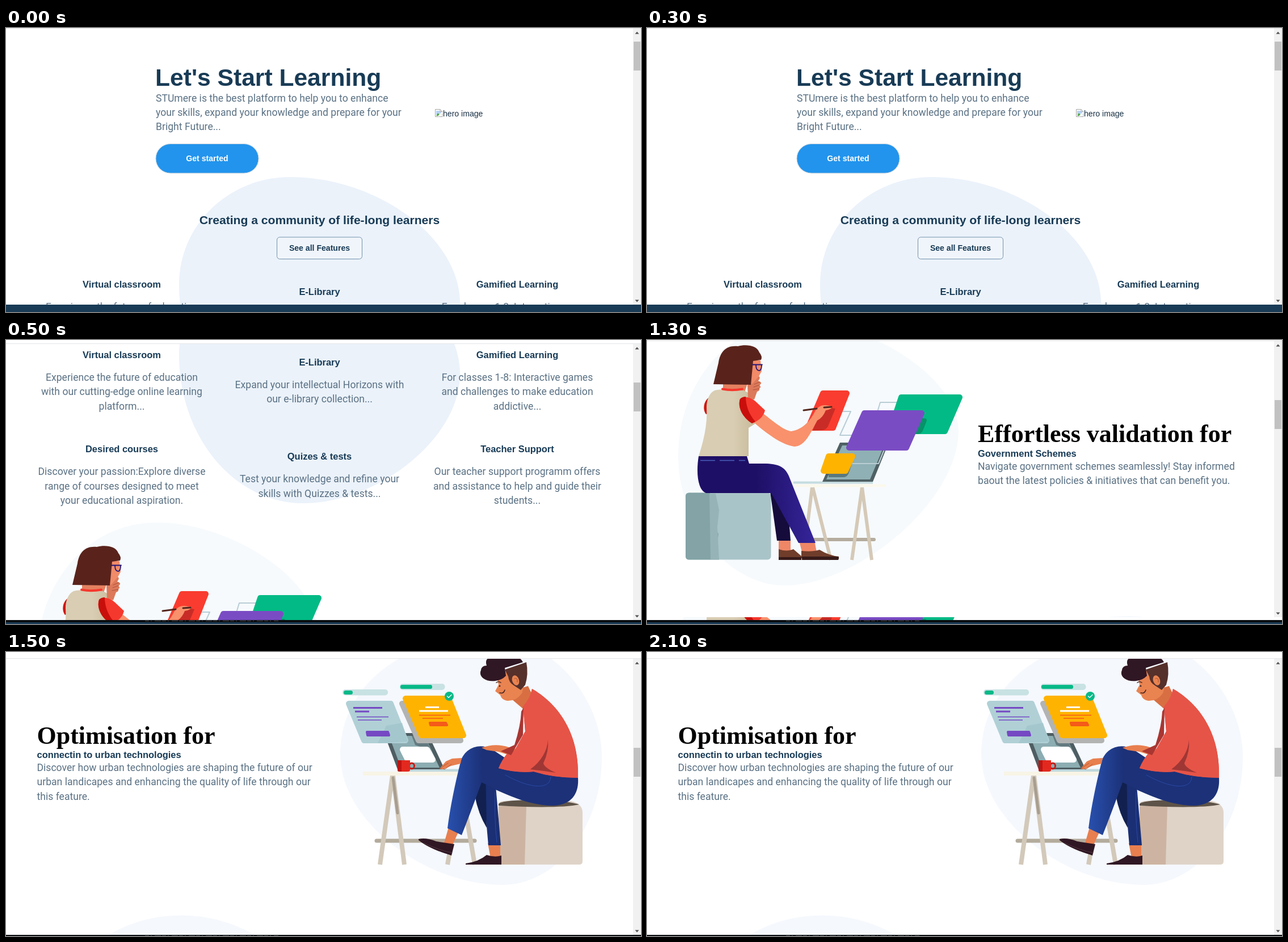
Animation, 1119 px wide and 501 px high, one loop 2500 ms. Source, as an HTML page:

```html
<!DOCTYPE html>
<html lang="en">
<head>
<meta charset="utf-8">
<title>Learning platform tour</title>
<style>
html, body { margin: 0; width: 100%; height: 100%; overflow: hidden; background: #fff; }
svg { display: block; width: 1119px; height: 501px; }
text { white-space: pre; }
.head { font: bold 16.47px "Liberation Sans", Arial, sans-serif; fill: #183b56; }
.body { font: 17.6px Roboto, sans-serif; fill: #5a7184; }
.serif { font: bold 44px "Liberation Serif", "Times New Roman", serif; fill: #000; }
.mid { text-anchor: middle; }
.card { fill: currentColor; stroke: currentColor; stroke-width: 10; stroke-linejoin: round; }
.line { fill: none; stroke-linecap: round; stroke-linejoin: round; }
</style>
</head>
<body>
<svg viewBox="0 0 1119 501">
  <defs>
    <clipPath id="viewClip"><rect id="viewBox" width="1105" height="488"/></clipPath>
    <clipPath id="stripClip"><rect y="489" width="1105" height="5"/></clipPath>
    <pattern id="dots" width="14" height="14" patternUnits="userSpaceOnUse" patternTransform="rotate(8)">
      <g fill="#f9c4b4"><circle cx="3" cy="3" r="1.8"/><circle cx="10" cy="10" r="1.8"/></g>
    </pattern>
    <linearGradient id="leg" x1="0" x2="1">
      <stop offset="0" stop-color="#2850ae"/><stop offset=".55" stop-color="#1c3178"/><stop offset="1" stop-color="#1c3178"/>
    </linearGradient>
    <linearGradient id="thigh" x1="0" x2="1">
      <stop offset=".5" stop-color="#1e0f66"/><stop offset="1" stop-color="#35259a"/>
    </linearGradient>
    <linearGradient id="shirt" x1="0" x2="1">
      <stop offset="0" stop-color="#d9cdb3"/><stop offset=".6" stop-color="#d9cdb3"/><stop offset="1" stop-color="#c5b898"/>
    </linearGradient>

    <g id="page">
      <!-- hero -->
      <text x="263" y="102" class="head" style="font-size:42.6px">Let's Start Learning</text>
      <g id="heroText"></g>
      <rect x="264" y="204.500" width="181" height="51.500" rx="25.700" fill="#2294ed" stroke="#b9cbd8"/>
      <text x="354.500" y="235" class="head mid" style="font-size:14.08px;fill:#fff">Get started</text>
      <g transform="translate(756 143)">
        <path d="M.5 .5H9L13 4.500V13.500H.5Z" fill="#fff" stroke="#a5a5a5"/>
        <path d="M2 3H8L11 6V8L2 10Z" fill="#b7d2f5"/>
        <path d="M2 12L5 7L8 10L6 12Z" fill="#53a844"/>
        <path d="M13 6L6 13" stroke="#fff" stroke-width="2"/>
        <path d="M9 .5V4.500H13" fill="none" stroke="#a5a5a5"/>
      </g>
      <text x="770" y="156" style="font:14.08px 'Liberation Sans',Arial,sans-serif;fill:#183044">hero image</text>

      <!-- features -->
      <path d="M500 263C655 263 800 370 800 486C800 600 655 714 523 714C403 714 305 598 305 452C305 348 392 263 500 263Z" fill="#ebf2fa"/>
      <text x="552.500" y="345.500" class="head mid" style="font-size:21.12px">Creating a community of life-long learners</text>
      <rect x="477.500" y="369" width="150" height="38.500" rx="5" fill="#f0f5fb" stroke="#7291aa"/>
      <text x="552.500" y="392.500" class="head mid" style="font-size:14.08px">See all Features</text>
      <g id="features"></g>

      <!-- woman at a desk -->
      <g transform="translate(0 780)">
        <path d="M270-32C400-30 549 70 549 160C549 285 370 433 243 433C140 433 55 320 55 205C55 80 140-34 270-32Z" fill="#f6fafd"/>
        <g class="line" stroke="#d5c9b7" stroke-width="6" stroke-linecap="butt">
          <path d="M292 352H400" stroke="#b5ac9e"/>
          <path d="M291 260L275 388M292 260L324 388M379 260L361 388M379 260L396 388" style="stroke-linecap:butt"/>
        </g>
        <rect x="262" y="254.500" width="159" height="5" fill="#fbf8ec"/>
        <rect x="258" y="249.500" width="140" height="4" fill="#c5dce0"/>
        <path d="M340 181H426L398 250H309Z" fill="#4f6064"/>
        <path d="M344 186H418L393 246H316Z" fill="#8fb0b4"/>
        <path d="M354 218H408L419 191M345 126H359L340 168H372M405 130L411 110H440" class="line" stroke="#b9cdd5" stroke-width="2"/>
        <path d="M448 101H551L525 161H428Z" class="card" color="#02ba85"/>
        <path d="M488 138Q495 138 492 145L486 160Q483 166 476 166H460L472 138Z" fill="#079269"/>
        <path d="M383 129H484L457 190H356Z" class="card" color="#7a4cc4"/>
        <path d="M366 205L355 236Q352 242 346 242H320V228Z" fill="#5a797e"/>
        <path d="M320 205H362L350 231H311Z" class="card" color="#ffb301"/>
        <path d="M310 94H352L328 155H284Z" class="card" color="#f93c2f"/>
        <path d="M320 119L332 121L319 152Q316 158 309 159L292 160L304 128Z" fill="#c92c26"/>
        <rect x="68" y="269.500" width="150.500" height="118" rx="6" fill="#a9c4c8"/>
        <path d="M74 269.500H111V280L114 295L111 318L126 342L123 365L127 387.500H74Q68 387.500 68 381.500V275.500Q68 269.500 74 269.500Z" fill="#83a3a6"/>
        <path d="M110 271H121L127 300L124 330L127 387H112Z" fill="#96b4b7"/>
        <path d="M232 352H253V373H232ZM268 354H295L299 374H273Z" fill="#ef8767"/>
        <path d="M232 369Q247 374 258 369L273 382V384H232ZM272 372Q292 374 304 370Q320 380 338 382V385H272Z" fill="#703d2b"/>
        <path d="M232 383H272V388H232ZM273 382H337Q339 385 337 388H273Z" fill="#381b19"/>
        <path d="M216 260L229 354H253L247 276Z" fill="#150c3c"/>
        <path d="M91 205H176L180 218H206C232 218 243 224 250 240L297 358H267L219 270H104C90 265 86 236 91 205Z" fill="url(#thigh)"/>
        <path d="M94 212.500H173" stroke="#4a62bb" stroke-width="1.300" stroke-dasharray="26 8"/>
        <path d="M114 99C98 105 98 124 104 131L118 125Z" fill="#cf1812"/>
        <path d="M134 74H178L172 92H134Z" fill="#e4805f"/>
        <path d="M119 89C135 85 155 88 170 89C190 95 198 125 190 148L179 155V205H91C99 180 107 150 105 119C105 107 109 94 119 89Z" fill="url(#shirt)"/>
        <path d="M133 86.500Q150 90 168 86.500" class="line" stroke="#f5382d" stroke-width="4"/>
        <path d="M184 36H200L202 55L196 66L190 79L177 82Z" fill="#f18b68"/>
        <path d="M177 80L186 77L197 64Q201 66 196 72L201 75Q202 78 197 79Q203 83 198 85Q199 90 194 91L189 105L178 101Z" fill="#dc795a"/>
        <path d="M188 83L199 79M187 88L198 86M189 78L199 74" class="line" stroke="#ad5039"/>
        <path d="M117 78L126 40C129 20 140 9 160 11C176 7 194 10 198 22Q204 29 201 35L187 37L183 79Z" fill="#59231c"/>
        <path d="M186 43.500H203M192 44Q192 54 198 54Q202 53 202 44" class="line" stroke="#211679" stroke-width="1.800"/>
        <path d="M199 125C222 143 240 159 254 161C275 158 289 141 297 124Q304 114 315 115L326 117Q327 122 315 124Q310 137 300 142C288 164 279 187 260 188C238 185 212 166 189 146Z" fill="#f9916c"/>
        <path d="M276 124L299 121M312 119L325 118" class="line" stroke="#54251d" stroke-width="3"/>
        <path d="M164 104C171 98 183 101 191 108L208 124Q204 140 185 147C169 137 159 119 164 104Z" fill="#f5382d"/>
        <path d="M164 104C159 119 169 137 185 147L191 144C179 130 174 115 174 100Q168 100 164 104Z" fill="#c90f0b"/>
      </g>
      <text x="583" y="960" class="serif">Effortless validation for</text>
      <text x="583" y="986" class="head">Government Schemes</text>
      <g id="schemeText"></g>

      <!-- man at a desk -->
      <g transform="translate(0 1294)">
        <path d="M850-27C960-27 1050 80 1050 185C1050 310 970 411 875 411C740 411 589 300 589 180C589 60 700-27 850-27Z" fill="#f5f8fd"/>
        <path d="M178 501Q235 465 310 464.500Q380 465 442 501Z" fill="#f5f8fd"/>
        <g class="line" stroke="#d3c9ba" stroke-width="8">
          <path d="M653 333H826" stroke="#b3ab9c" stroke-width="7"/>
          <path d="M681 218L659 375M682 218L702 375M806 218L778 375M808 270L826 375" style="stroke-linecap:butt"/>
          <path d="M682 222L690 284" stroke="#a89e90" stroke-width="5"/>
        </g>
        <rect x="629" y="211" width="172" height="7" fill="#f8f4e6"/>
        <rect x="690" y="206.500" width="125" height="4.500" fill="#bfd8dc"/>
        <path d="M666 143H743L773 207H690Z" fill="#4e5e63"/>
        <path d="M675 148H738L764 204H696Z" fill="#8cadb2"/>
        <path d="M715 148H738L749 174L721 164Z" fill="#647b80"/>
        <path d="M699 172H742L752 190H708Z" class="card" color="#fff"/>
        <rect x="593" y="66" width="80" height="10.500" rx="5" fill="#c8e2e3"/>
        <rect x="595" y="68" width="16" height="7" rx="3.500" fill="#08b987"/>
        <rect x="694" y="56" width="79.500" height="11" rx="5" fill="#c8e2e3"/>
        <rect x="695" y="58" width="56" height="7" rx="3" fill="#08b987"/>
        <path d="M604 91H678L704 156H631Z" class="card" color="#b0d0d6"/>
        <path d="M670 130L698 125L708 158L655 161Z" fill="#9fc3ca" opacity=".65"/>
        <g fill="none" stroke="#7549c3">
          <path d="M612 98.500H663M615 105H640" stroke-width="3"/>
          <path d="M618 114.500H674M620 120H662" stroke-width="1.300"/>
          <path d="M636 141H673L675 147H637Z" class="card" color="#7549c3" style="stroke-width:4"/>
        </g>
        <path d="M698 91H774L801 156H727Z" class="card" color="#b2b4b3"/>
        <path d="M704 82H780L806 147H732Z" class="card" color="#ffb301"/>
        <path d="M739 97.500H763M728 104H779" stroke="#fff" stroke-width="3"/>
        <path d="M728 111.500H783M734 117H770" stroke="#f55a19" stroke-width="1.500"/>
        <path d="M747 125H775L777 129H748Z" class="card" color="#f55a19" style="stroke-width:4"/>
        <circle cx="781" cy="78" r="8" fill="#08b987"/>
        <path d="M777.500 78L780 80.500L785 75.500" class="line" stroke="#fff" stroke-width="1.300"/>
        <ellipse cx="715" cy="201" rx="4.500" ry="5" fill="none" stroke="#c91b16" stroke-width="3"/>
        <path d="M690 191H712V208Q712 211 708 211H694Q690 211 690 208Z" fill="#e3291f"/>
        <path d="M690 191H697V211H694Q690 211 690 208Z" fill="#bd1512"/>

        <path d="M868 268Q868 262 890 262H990Q1016 265 1016 284V369Q1016 375 1010 375H868Z" fill="#dfd3c8"/>
        <path d="M868 272H917L914 375H868Z" fill="#cdb4a2"/>
        <path d="M868 268C875 258 980 259 1010 269C985 275 920 274 868 271Z" fill="#5e5348"/>
        <path d="M780 309L798 316L786 342L772 337ZM849 337H871V364H854Z" fill="#e87f4f"/>
        <path d="M727 330Q740 327 758 334L790 339L785 359C766 353 745 346 727 332ZM810 373Q833 370 847 358Q862 363 873 359V375H810Z" fill="#301724"/>
        <path d="M736 337Q766 351 786 354" class="line" stroke="#513640"/>
        <path d="M822 215L842 250L850 341H872L862 225Z" fill="#1a2f74"/>
        <path d="M826 215L845 205L847 310Q829 280 824 240Z" fill="#11204f"/>
        <path d="M857 172L910 207C946 213 985 217 1008 222C1010 250 996 270 965 271C925 271 890 255 861 242Z" fill="#1c3178"/>
        <path d="M778 311C783 270 794 222 800 198C805 170 833 160 852 170L890 201L862 241L838 230Q823 272 803 323Z" fill="url(#leg)"/>
        <path d="M880 217Q922 240 946 236Q960 233 960 220M862 248Q860 290 865 336" class="line" stroke="#2b49a4"/>
        <path d="M838 169Q862 160 886 168L904 172L897 185L868 176L847 173Z" fill="#e87f4f"/>
        <path d="M764 206L775 193L786 188L803 187L801 197L784 201L770 207Z" fill="#e87f4f"/>
        <path d="M764 206L779 196M773 207L785 198" class="line" stroke="#b65c37"/>
        <path d="M887 70L920 60L927 75L912 101Q899 90 891 83Z" fill="#d86f43"/>
        <path id="torso" d="M927 65C967 88 1011 137 1008 222Q965 222 930 211Q900 214 868 205Q874 190 885 177L896 174L915 140L911 96Q924 82 927 65Z" fill="#e65447"/>
        <use href="#torso" style="fill:url(#dots)"/>
        <path d="M912 98L911 146L890 182L872 175L896 164Q907 130 908 105Z" fill="#a93632"/>
        <path d="M955 155Q953 185 924 207L948 210L969 213Q948 204 947 196Q957 175 955 155Z" fill="#9f3735"/>
        <path d="M864 38L903 25L916 48L909 73Q899 87 883 86Q873 84 871 76L862 69L868 58Z" fill="#e98350"/>
        <path d="M879 31L917 18Q921 39 915 58L907 67L895 59Q886 54 885 43Z" fill="#56302b"/>
        <path d="M862 51C844 53 832 43 837 32Q838 24 847 24Q843 12 854 9Q863 3 877 9Q904 3 911 18L879 28L881 42Q873 50 862 51Z" fill="#301724"/>
        <ellipse cx="898" cy="50" rx="6" ry="9" fill="#e98350" transform="rotate(-20 898 50)"/>
        <path d="M896 47Q902 44 901 53" class="line" stroke="#a94e32"/>
        <path d="M864 54Q868 51 872 54M870 72Q877 74 879 67" class="line" stroke="#43231f" stroke-width="1.500"/>
        <circle cx="870" cy="60" r="1.300" fill="#301724"/>
      </g>
      <text x="54.500" y="1456" class="serif">Optimisation for</text>
      <text x="54.500" y="1481" class="head">connectin to urban technologies</text>
      <g id="cityText"></g>
    </g>
  </defs>

  <rect width="1119" height="501" fill="#fff"/>
  <g clip-path="url(#viewClip)"><use id="scroller" href="#page"/></g>
  <g id="strip" clip-path="url(#stripClip)"><use href="#page" y="-426"/></g>
  <g id="chrome">
    <rect width="1119" height="1" fill="#e3e5e7"/>
    <rect x="1105" y="1" width="14" height="487" fill="#f1f1f1"/>
    <path d="M1108.500 10.500L1112 6.500L1115.500 10.500ZM1108.500 479.500L1112 483.500L1115.500 479.500Z" fill="#505050"/>
    <rect id="thumb" x="1106" width="12" height="51" fill="#c1c1c1"/>
  </g>
  <rect id="black" width="1119" height="7" fill="#0a0d10"/>
  <path id="specks" d="M245 1.500H480" stroke="#4b4e50" stroke-dasharray="7 3 2 5 11 2"/>
  <rect id="navy" width="1119" height="13" fill="#193b56"/>
</svg>
<script>
const $ = id => document.getElementById(id);
const LEAD = 25.4;

function addText(parent, x, y, cls, str) {
  const el = document.createElementNS("http://www.w3.org/2000/svg", "text");
  el.setAttribute("x", x);
  el.setAttribute("y", y);
  el.setAttribute("class", cls);
  el.textContent = str;
  parent.append(el);
}

function addLines(id, x, y, lines, cls = "body") {
  lines.forEach((s, i) => addText($(id), x, y + i * LEAD, cls, s));
}

addLines("heroText", 264, 129.5, [
  "STUmere is the best platform to help you to enhance",
  "your skills, expand your knowledge and prepare for your",
  "Bright Future..."]);
addLines("schemeText", 583, 1008.5, [
  "Navigate government schemes seamlessly! Stay informed",
  "baout the latest policies & initiatives that can benefit you."]);
addLines("cityText", 54.5, 1504, [
  "Discover how urban technologies are shaping the future of our",
  "urban landicapes and enhancing the quality of life through our",
  "this feature."]);

const features = [
  ["Virtual classroom", "Experience the future of education", "with our cutting-edge online learning", "platform..."],
  ["E-Library", "Expand your intellectual Horizons with", "our e-library collection..."],
  ["Gamified Learning", "For classes 1-8: Interactive games", "and challenges to make education", "addictive..."],
  ["Desired courses", "Discover your passion:Explore diverse", "range of courses designed to meet", "your educational aspiration."],
  ["Quizes & tests", "Test your knowledge and refine your", "skills with Quizzes & tests..."],
  ["Teacher Support", "Our teacher support programm offers", "and assistance to help and guide their", "students..."]
];
features.forEach(([title, ...lines], i) => {
  const col = i % 3;
  const x = 204 + col * 348.5;
  const y = 458 + Math.floor(i / 3) * 166.3 + (col === 1 ? 12.8 : 0);
  addText($("features"), x, y, "head mid", title);
  addLines("features", x, y + 40, lines, "body mid");
});

// The page jumps between scroll stops; top is the window's upper edge.
const stops = [
  { at: 0, scroll: 0, top: 0, thumb: 24, black: 501, navy: 488 },
  { at: 500, scroll: 426, top: 6, thumb: 69, black: 494, navy: 498 },
  { at: 1000, scroll: 780, top: 1, thumb: 105, black: 494, navy: 498, strip: true },
  { at: 1500, scroll: 1294, top: 11, thumb: 158, black: 499, navy: 501 }
];
const LOOP = 2500;

function draw(time) {
  const t = time % LOOP;
  const s = stops.findLast(stop => t >= stop.at);
  $("scroller").setAttribute("y", -s.scroll);
  $("viewBox").setAttribute("y", s.top);
  $("chrome").setAttribute("transform", `translate(0 ${s.top})`);
  $("thumb").setAttribute("y", s.thumb);
  $("black").setAttribute("y", s.black);
  $("specks").setAttribute("transform", `translate(0 ${s.black})`);
  $("navy").setAttribute("y", s.navy);
  $("strip").style.display = s.strip ? "" : "none";
}

const start = performance.now();
function tick(now) {
  draw(Math.max(0, now - start));
  requestAnimationFrame(tick);
}
draw(0);
requestAnimationFrame(tick);
</script>
</body>
</html>
```
